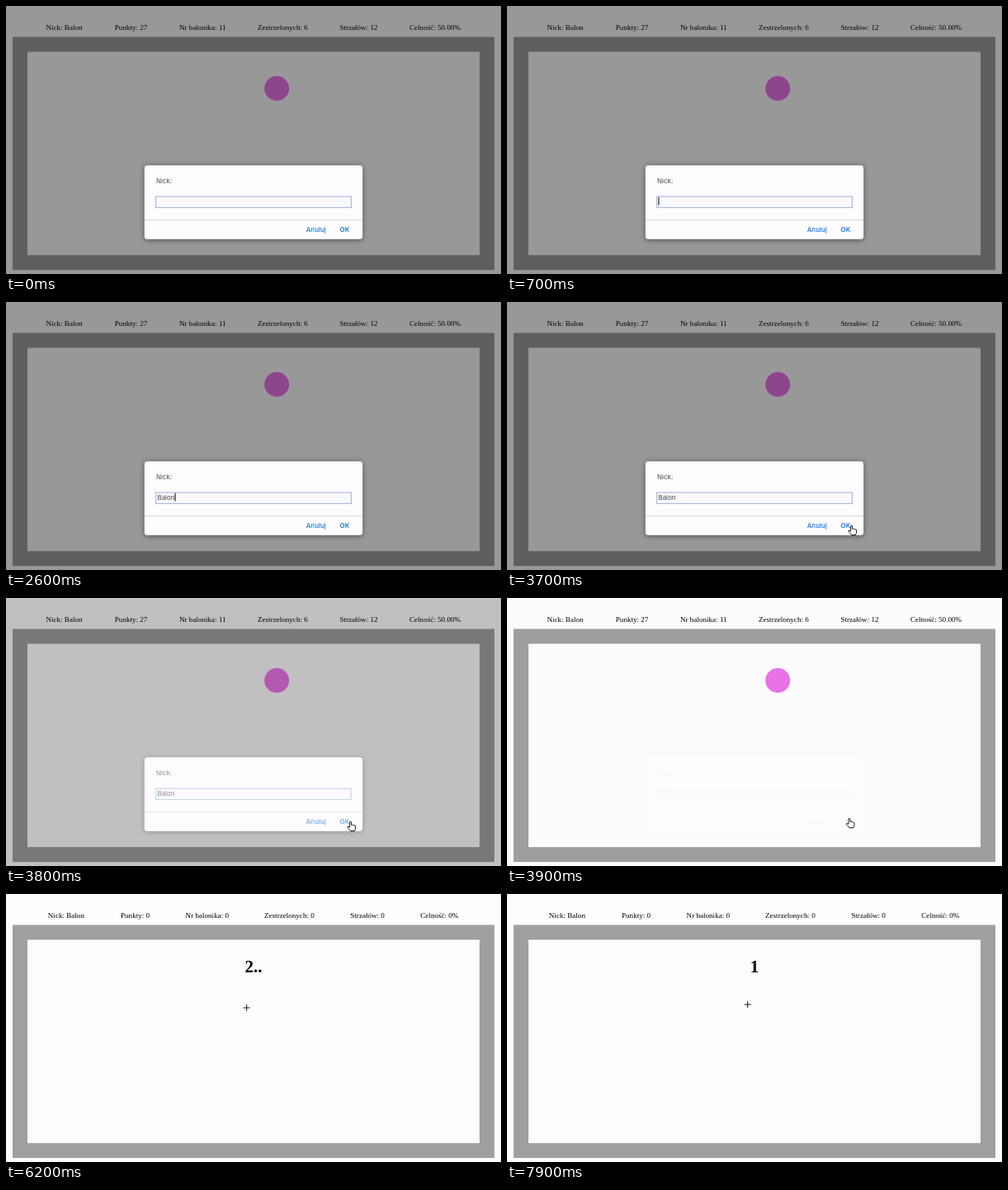
Recreate the animation shown at these times as an HTML page. Size 600 by 325 pixels, loop 8000 ms.

```html
<!DOCTYPE html>
<html lang="pl">
<head>
<meta charset="utf-8">
<title>Baloniki</title>
<style>
  html, body { margin: 0; width: 100%; height: 100%; overflow: hidden; background: #fefcfe; }
  svg { display: block; width: 600px; height: 325px; }
  #stats, #count { font-family: "Liberation Serif", "Times New Roman", serif; }
  #stats { font-size: 9.08px; }
  #count { font-size: 21px; font-weight: bold; text-anchor: middle; }
  #modal { font: 8px Inter, Roboto, sans-serif; }
  #box { filter: drop-shadow(0 1px 3px rgba(0, 0, 0, .5)); }
  #arrow, #hand { fill: #fff; stroke: #000; stroke-width: .9; stroke-linejoin: round; }
  #cross { stroke: #000; stroke-width: .9; }
</style>
</head>
<body>
<svg viewBox="0 0 600 325">
  <rect width="600" height="325" fill="#fefcfe"/>
  <rect x="17" y="46.5" width="566" height="264.6" fill="none" stroke="#a09ea0" stroke-width="18"/>
  <circle id="balloon" cx="328.2" cy="100" r="15" fill="#eb73e9"/>
  <text id="count" x="300" y="95"></text>
  <g id="modal">
    <rect width="600" height="325" opacity=".4"/>
    <rect id="box" x="167.8" y="193.3" width="264.4" height="89.5" rx="3.5" fill="#fefcfe"/>
    <text x="182" y="215" fill="#48464a">Nick:</text>
    <rect x="181.6" y="231" width="236.8" height="13.4" fill="#f9f8fc" stroke="#9fb3d6"/>
    <text id="typed" x="183.4" y="239.6" fill="#4c4a4e"></text>
    <rect id="caret" y="231.8" width="1" height="9.6"/>
    <path d="M168 259.5H432" stroke="#dad8dc"/>
    <g fill="#1a76dc">
      <text x="363.7" y="274.3" font-weight="500">Anuluj</text>
      <text x="404.6" y="274.3" font-weight="600">OK</text>
    </g>
  </g>
  <g id="stats"></g>
  <g id="cursor">
    <path id="arrow" d="M0 0V9.5L2.2 7.5 3.7 11 5.2 10.3 3.7 7H6.8Z"/>
    <path id="hand" d="M-1 7V1a1 1 0 0 1 2 0V4.2q1-.6 1.8.2 1-.5 1.7.4 1.5-.2 1.5 1.2V8q0 1.5-1 2.7V11.5H0q-1-1.8-3.6-4.2-.3-1.6 1-1.2Z"/>
    <path id="cross" d="M-4 0H4M0-4V4"/>
  </g>
</svg>
<script>
const $ = id => document.getElementById(id);
const LOOP = 8000, STEP = 100, RESET = 4000;
const nick = "Balon";
const keyTimes = [1300, 1600, 1800, 2000, 2200];

const labels = ["Nick", "Punkty", "Nr balonika", "Zestrzelonych", "Strzałów", "Celność"];
const oldGame = { values: [nick, 27, 11, 6, 12, "50.00%"], xs: [48.4, 131.8, 210, 305, 404.4, 489] };
const newGame = { values: [nick, 0, 0, 0, 0, "0%"], xs: [50.8, 139, 217.6, 313, 417.3, 502.3] };
const countdown = ["Przygotuj się", "3..", "2..", "1"];

// time, x, y
const path = [
  [3200, 426, 232], [3500, 417.6, 271], [3800, 417.6, 271], [3900, 415, 267.2],
  [4500, 316, 110], [4800, 312.3, 105.5], [5100, 312.3, 105.5], [5800, 291.7, 143],
  [5900, 291.7, 143], [6200, 291.7, 138], [7800, 291.7, 138], [7900, 291.7, 134]
];

const show = (id, on) => $(id).setAttribute("visibility", on ? "visible" : "hidden");

function cursorAt(t) {
  const i = path.findIndex(p => p[0] > t);
  if (i < 1) return path[i < 0 ? path.length - 1 : 0].slice(1);
  const [t0, x0, y0] = path[i - 1], [t1, x1, y1] = path[i];
  const u = (t - t0) / (t1 - t0), k = u * u * (3 - 2 * u);
  return [x0 + (x1 - x0) * k, y0 + (y1 - y0) * k];
}

function drawStats({ values, xs }) {
  $("stats").innerHTML = labels
    .map((label, i) => `<text x="${xs[i]}" y="29">${label}: ${values[i]}</text>`).join("");
}

function drawModal(t) {
  const fade = t < 3800 ? 1 : t < 3900 ? .6 : t < RESET ? .01 : 0;
  $("modal").setAttribute("opacity", fade);
  const pressed = keyTimes.filter(k => k <= t);
  $("typed").textContent = nick.slice(0, pressed.length);
  const last = pressed.length ? pressed[pressed.length - 1] : -500;
  show("caret", (t - last) % 1000 < 500 && t < 3700);
  const width = pressed.length ? $("typed").getComputedTextLength() : 0;
  $("caret").setAttribute("x", 183.4 + width);
}

function drawCursor(t) {
  const [x, y] = cursorAt(t);
  $("cursor").setAttribute("transform", `translate(${x} ${y})`);
  show("arrow", t >= 3200 && t < 3400);
  show("hand", t >= 3400 && t < RESET);
  show("cross", t >= RESET);
}

function frame(now) {
  const t = Math.floor(now % LOOP / STEP) * STEP;
  const started = t >= RESET;
  drawStats(started ? newGame : oldGame);
  drawModal(t);
  show("balloon", !started);
  $("count").textContent = started ? countdown[Math.floor((t - RESET) / 1000)] : "";
  drawCursor(t);
  requestAnimationFrame(frame);
}
frame(0);
</script>
</body>
</html>
```
